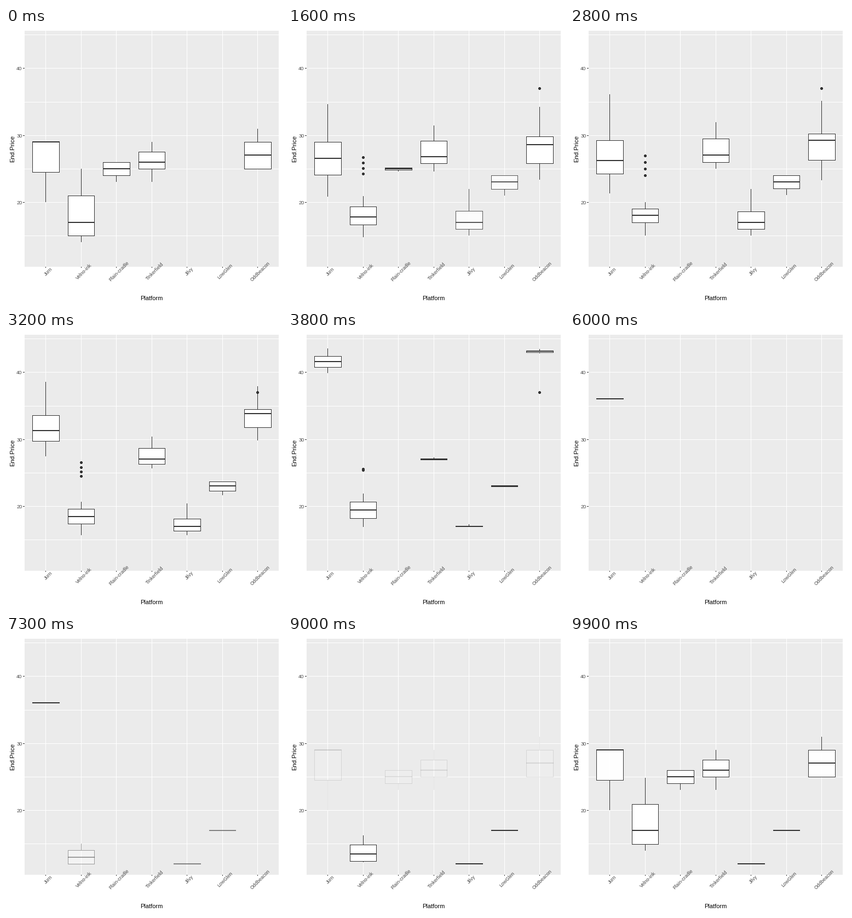
A matplotlib script for the animation above (10 s loop, 504x504 px).

```python
import math

import matplotlib.pyplot as plt
from matplotlib.animation import FuncAnimation
from matplotlib.patches import Circle, Rectangle

SIZE = 504
FRAMES, INTERVAL = 100, 100
LEFT, TOP, RIGHT, BOTTOM = 34, 5, 498, 436
STEP_X, UNIT_Y = 64.51, 12.23
INK, GREY, PANEL = "#333333", "#4D4D4D", "#EBEBEB"

PLATFORMS = ["Jurn", "Velno-ink", "Plain-cradle", "Tinkerfield",
             "Jilvy", "LowGlen", "Oddbeacon"]


def box(low, mid=None, high=None, below=0.5, above=0.5, dots=()):
    """Box edges lie a share of the way from the median to each extreme."""
    mid = low if mid is None else mid
    high = mid if high is None else high
    stats = (low, mid - below * (mid - low), mid,
             mid + above * (high - mid), high)
    return stats, tuple(dots)


STATES = [
    {"Jurn": box(20, 29),
     "Velno-ink": box(14, 17, 25, below=2 / 3),
     "Plain-cradle": box(23, 25, 26, above=1),
     "Tinkerfield": box(23, 26, 29, below=1 / 3),
     "Oddbeacon": box(25, 27, 31, below=1)},
    {"Jurn": box(21, 26, 36, below=0.4, above=0.3),
     "Velno-ink": box(15, 18, 20, below=1 / 3, dots=range(24, 28)),
     "Tinkerfield": box(25, 27, 32),
     "Jilvy": box(15, 17, 22, above=1 / 3),
     "LowGlen": box(21, 23, 24, above=1),
     "Oddbeacon": box(23, 29, 35, above=1 / 6, dots=[37])},
    {"Jurn": box(41, 42.5, 44),
     "Velno-ink": box(17, 19.5, 22),
     "Oddbeacon": box(44)},
    {"Jurn": box(36)},
    {"Velno-ink": box(12, 13, 15, below=1),
     "Jilvy": box(12),
     "LowGlen": box(17)},
]
SPAN = FRAMES // len(STATES)


def x_pos(index):
    return LEFT + 0.15 + STEP_X * (index + 0.6)


def row(value):
    return math.floor(5.48 + (45.6 - value) * UNIT_Y)


def mix(a, b, p):
    return tuple(u + (v - u) * p for u, v in zip(a, b))


def mix_dots(a, b, p):
    """Points gather at their mean when the other state has none."""
    known = a or b
    if not known:
        return ()
    centre = (sum(known) / len(known),) * len(known)
    return mix(a or centre, b or centre, p)


def pose(frame):
    """Return (name, stats, dots, alpha) for every visible box."""
    state, step = divmod(frame, SPAN)
    now, then = STATES[state], STATES[(state + 1) % len(STATES)]
    hold = 7 if state else 6
    if step <= hold:
        return [(name, *item, 1) for name, item in now.items()]

    p = (1 - math.cos(math.pi * (step - hold) / (SPAN - hold))) / 2
    boxes = []
    for name in PLATFORMS:
        if name in now:
            stats, dots = now[name]
            # A leaving box shrinks onto its median.
            goal, goal_dots = then.get(name, box(stats[2]))
            boxes.append((name, mix(stats, goal, p),
                          mix_dots(dots, goal_dots, p), 1))
        elif name in then:
            boxes.append((name, *then[name], p))
    return boxes


plt.rcParams["font.family"] = "Liberation Sans"
fig = plt.figure(figsize=(SIZE / 72, SIZE / 72), dpi=72, facecolor="white")
ax = fig.add_axes([0, 0, 1, 1])
ax.set_xlim(0, SIZE)
ax.set_ylim(SIZE, 0)
ax.axis("off")


def block(x0, y0, x1, y1, color, alpha=1, z=1):
    return ax.add_patch(Rectangle((x0, y0), x1 - x0, y1 - y0, fc=color, lw=0,
                                  alpha=alpha, antialiased=False, zorder=z))


def label(x, y, text, size, color, ha="center", angle=0):
    ax.text(x, y, text, size=size, color=color, ha=ha, va="baseline",
            rotation=angle, rotation_mode="anchor", zorder=2)


def draw_background():
    block(LEFT, TOP, RIGHT, BOTTOM, PANEL)
    for value in range(15, 50, 5):
        block(LEFT, row(value), RIGHT, row(value) + 1, "white")
    for index, name in enumerate(PLATFORMS):
        x = math.floor(x_pos(index))
        block(x, TOP, x + 1, BOTTOM, "white")
        block(x, BOTTOM, x + 1, BOTTOM + 2, INK)
        label(x + 7, 446.5, name, 9, GREY, angle=45)
    for value in (20, 30, 40):
        y = row(value)
        block(LEFT - 3, y, LEFT, y + 1, INK)
        label(29.5, y + 4, str(value), 9.2, GREY, ha="right")
    label(266, 497, "Platform", 11, "black")
    label(15, 220.5, "End.Price", 11.4, "black", angle=90)


def draw_box(name, stats, dots, alpha):
    low, lower, middle, upper, high = map(row, stats)
    centre, half = x_pos(PLATFORMS.index(name)), 0.375 * STEP_X
    x, left, right = map(math.floor, (centre, centre - half, centre + half))
    end = right + 1

    bars = [(x, high, x + 1, upper, INK),
            (x, lower, x + 1, low, INK),
            (left, upper, end, lower, "white"),
            (left, upper, end, upper + 1, INK),
            (left, middle - 1, end, middle + 1, INK)]
    if lower > upper:
        bars += [(left, lower, end, lower + 1, INK),
                 (left, upper + 1, left + 1, lower, INK),
                 (right, upper + 1, end, lower, INK)]
    parts = [ax.add_patch(Circle((x + 0.5, row(v) + 0.5), 2.1, fc=INK, lw=0,
                                 alpha=alpha, antialiased=False, zorder=3))
             for v in dots]
    return parts + [block(*bar, alpha, 3) for bar in bars if bar[3] > bar[1]]


shown = []


def update(frame):
    while shown:
        shown.pop().remove()
    for item in pose(frame):
        shown.extend(draw_box(*item))
    return shown


draw_background()
anim = FuncAnimation(fig, update, frames=FRAMES, interval=INTERVAL,
                     init_func=lambda: update(0), repeat=True, repeat_delay=0)
plt.show()
```
